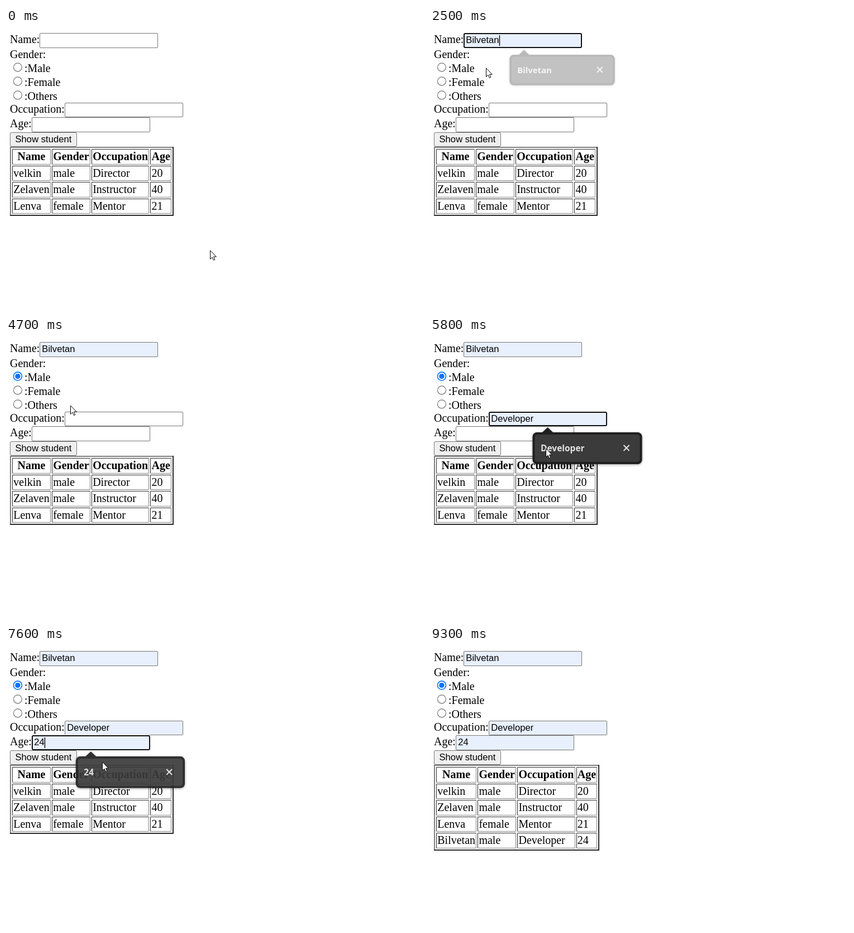
An HTML page that plays this animation: 748x504 px, repeating every 9.4 s.

```html
<!DOCTYPE html>
<html lang="en">
<head>
<meta charset="utf-8">
<title>Student form</title>
<style>
  html, body { margin: 0; width: 748px; height: 504px; overflow: hidden; background: #fff; }
  svg { display: block; }
  text { font: 20px "Liberation Serif", "Times New Roman", serif; white-space: pre; }
  .head { font-weight: bold; text-anchor: middle; }
  .ui { font: 16.667px "Liberation Sans", Arial, sans-serif; }
  .tip { font: 700 15.5px "Open Sans", "Noto Sans", sans-serif; fill: #e3e3e3; }
  .popup { filter: drop-shadow(0 1px 2px #0006); transform-box: fill-box; transform-origin: center; }
</style>
</head>
<body>
<svg id="stage" width="748" height="504"></svg>
<script>
const stage = document.getElementById('stage');
const LOOP = 9400, STEP = 100, CHECKED = 3100, ADDED = 8200;
const LEFT = 7, FIELD_W = 212, FIELD_H = 26.5, POPUP_W = 196, POPUP_H = 57, ROW_H = 29.5;
const DARK = '#2c2c2c', GRAY = '#808080', EDGE = '#767676', EDGE_HOVER = '#4f4f4f';

const pen = document.createElement('canvas').getContext('2d');
function widthOf(s, font) {
  pen.font = font;
  return pen.measureText(s).width;
}
const SERIF = '20px "Liberation Serif", "Times New Roman", serif';
const SANS = '16.667px "Liberation Sans", Arial, sans-serif';

// Pointer stops: time, x, y
const stops = [
  [0, 365, 398], [1200, 116, 18], [1500, 116, 18], [2000, 178, 71], [3000, 22, 71],
  [3400, 22, 71], [4100, 29, 74], [4300, 29, 74], [4900, 145, 139], [5200, 145, 139],
  [5700, 210, 200], [6400, 159, 185], [6900, 140, 174], [7600, 172, 207],
  [8200, 72, 204], [8400, 72, 204], [8900, 40, -24], [LOOP + 1, 40, -24]
];

// Each field gets focus, offers a suggestion, previews it on hover and fills it on pick
const fields = [
  { label: 'Name:', value: 'Bilvetan', y: 9.2, focus: 1300, pick: 2200, blur: 3000 },
  { label: 'Occupation:', value: 'Developer', y: 133.6, focus: 5000, pick: 6000, blur: 6700 },
  { label: 'Age:', value: '24', y: 160.1, focus: 6700, pick: 7500, blur: 8100 }
].map(f => ({
  ...f,
  x: Math.round(LEFT + widthOf(f.label, SERIF)),
  y: Math.round(f.y),
  bottom: Math.round(f.y + FIELD_H),
  show: f.focus + 200,
  hover: f.focus + 500
}));
for (const f of fields) {
  f.popX = f.x + FIELD_W / 2 - 27.5;
  f.popY = f.bottom + 11;
}

const colWidths = [68.9, 69, 103.4, 37.8], GROWTH = 3.3;
const rows = [
  ['Name', 'Gender', 'Occupation', 'Age'],
  ['velkin', 'male', 'Director', '20'],
  ['Zelaven', 'male', 'Instructor', '40'],
  ['Lenva', 'female', 'Mentor', '21'],
  ['Bilvetan', 'male', 'Developer', '24']
];

const text = (s, x, y, cls = '') => `<text x="${x}" y="${y}" class="${cls}">${s}</text>`;
const rect = (x, y, w, h, r, fill, stroke = 'none', line = 1) =>
  `<rect x="${x}" y="${y}" width="${w}" height="${h}" rx="${r}" fill="${fill}" stroke="${stroke}" stroke-width="${line}"/>`;
const line = (d, stroke, w = 1, fill = 'none') =>
  `<path d="${d}" fill="${fill}" stroke="${stroke}" stroke-width="${w}"/>`;
const within = (p, x, y, w, h) => p.x >= x && p.x < x + w && p.y >= y && p.y < y + h;
const overField = (p, f) => within(p, f.x, f.y, FIELD_W, f.bottom - f.y);

function pointerAt(t) {
  const i = stops.findIndex(s => s[0] > t);
  const [t0, x0, y0] = stops[i - 1], [t1, x1, y1] = stops[i];
  const k = (t - t0) / (t1 - t0), ease = k * k * (3 - 2 * k);
  return { x: Math.round(x0 + (x1 - x0) * ease), y: Math.round(y0 + (y1 - y0) * ease) };
}

function bevel(x0, y0, x1, y1, w, first, second) {
  const h = w / 2;
  return line(`M${x0 + h} ${y1}V${y0 + h}H${x1}`, first, w) +
    line(`M${x1 - h} ${y0}V${y1 - h}H${x0}`, second, w);
}

function field(f, t, p) {
  const { x, y, bottom, value } = f, h = bottom - y, base = y + 18;
  const focused = t >= f.focus && t < f.blur, filled = t >= f.hover, picked = t >= f.pick;
  const fill = filled ? '#e8f0fe' : '#fff';
  let out = text(f.label, LEFT, base);
  out += focused
    ? rect(x - .5, y - .5, FIELD_W + 1, h + 1, 3, 'none', '#fff') +
      rect(x + 1, y + 1, FIELD_W - 2, h - 2, 2, fill, '#101010', 2)
    : rect(x + .5, y + .5, FIELD_W - 1, h - 1, 1.5, fill, overField(p, f) ? EDGE_HOVER : EDGE);
  if (filled) out += text(value, x + 4.3, base, 'ui');
  if (focused && (t - (picked ? f.pick : f.focus)) % 1000 < 500) {
    const caret = Math.round(x + 4.3 + (picked ? widthOf(value, SANS) : 1)) + .5;
    out += line(`M${caret} ${y + 4}V${bottom - 4}`, '#000', 1.4);
  }
  return out;
}

function popup(f, t) {
  const gone = Math.max(0, t - f.pick) / 360, alpha = 1 - gone * gone;
  if (t < f.show || alpha <= 0) return '';
  const x = f.popX, y = f.popY;
  let out = line(`M${x + 17} ${y + .5}L${x + 27} ${y - 9}L${x + 37} ${y + .5}Z`, 'none', 0, '#1f1f1f') +
    rect(x, y, POPUP_W, POPUP_H, 8, '#1f1f1f');
  if (t >= f.hover) {
    out += rect(x + 4, y + 4, POPUP_W - 8, POPUP_H - 8, 5, '#3b3b3b') +
      line(`M${x + 163} ${y + 23}l10 10m0-10l-10 10`, '#e3e3e3', 2);
  }
  out += text(f.value, x + 14.5, y + 34, 'tip');
  return `<g class="popup" opacity="${alpha}" style="transform:scale(${1 - .055 * (1 - alpha)})">${out}</g>`;
}

function radio(label, i, t, p) {
  const y = 70.4 + 25 * i, checked = !i && t >= CHECKED;
  const hot = within(p, 13, y - 8, 16, 17);
  const color = checked ? (hot ? '#005cc8' : '#0075ff') : (hot ? EDGE_HOVER : EDGE);
  return `<circle cx="21" cy="${y}" r="7.5" fill="#fff" stroke="${color}" stroke-width="${checked ? 1.6 : 1.2}"/>` +
    (checked ? `<circle cx="21" cy="${y}" r="4.7" fill="${color}"/>` : '') +
    text(label, 33, 79 + 25 * i);
}

function button(p) {
  const hot = within(p, LEFT, 187, 120, 26);
  return rect(LEFT + .5, 187.5, 119, 25, 2.5, hot ? '#e5e5e5' : '#efefef', hot ? EDGE_HOVER : EDGE) +
    text('Show student', 16.5, 205, 'ui');
}

function table(t) {
  const added = t >= ADDED, shown = rows.slice(0, added ? 5 : 4);
  let out = '', x = LEFT + 4, right, bottom;
  colWidths.forEach((w, c) => {
    const end = x + w + (added && !c ? GROWTH : 0);
    const left = Math.round(x);
    right = Math.round(end);
    shown.forEach((row, r) => {
      const top = 217 + ROW_H * r, base = Math.round(top + 20);
      bottom = Math.round(top + ROW_H - 2);
      out += bevel(left, Math.round(top), right, bottom, 1, DARK, GRAY) +
        (r ? text(row[c], x + 2.25, base) : text(row[c], (x + end) / 2, base, 'head'));
    });
    x = end + 2;
  });
  return bevel(LEFT, 213, right + 4, bottom + 4, 2, GRAY, DARK) + out;
}

function pointer(t, p) {
  const overPopup = fields.some(f => t >= f.show && t < f.pick && within(p, f.popX, f.popY, POPUP_W, POPUP_H));
  const beam = !overPopup && fields.some(f => overField(p, f));
  const shape = beam
    ? line('M-2.5-7.5H-.5L.5-6.5 1.5-7.5H3.5M.5-6.5V6.5M-2.5 7.5H-.5L.5 6.5 1.5 7.5H3.5', '#000')
    : line('M.5 1V16.5L4 13.2 6.4 18.5 8.8 17.5 6.5 12.2H11.3Z', '#000', 1, '#fff');
  return `<g transform="translate(${p.x} ${p.y})">${shape}</g>`;
}

function draw(t) {
  const p = pointerAt(t);
  stage.innerHTML = text('Gender:', LEFT, 54) +
    [':Male', ':Female', ':Others'].map((s, i) => radio(s, i, t, p)).join('') +
    fields.map(f => field(f, t, p)).join('') +
    button(p) + table(t) +
    fields.map(f => popup(f, t)).join('') +
    pointer(t, p);
}

let last = -1;
function tick() {
  const t = Math.floor(performance.now() % LOOP / STEP) * STEP;
  if (t !== last) draw(last = t);
  requestAnimationFrame(tick);
}
tick();
</script>
</body>
</html>
```
